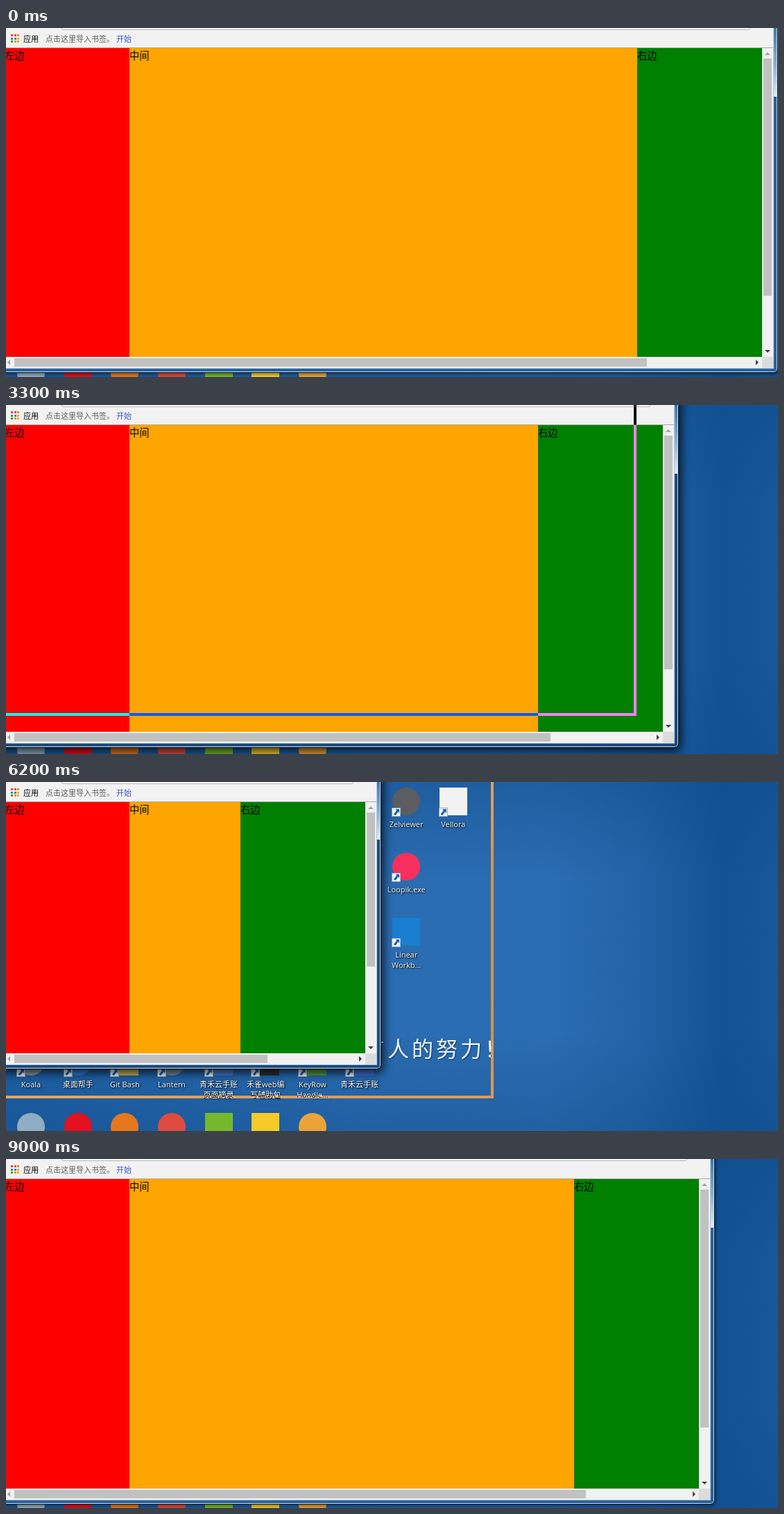
An HTML page for the animation above (9200 ms loop, 1113 by 503 pixels).

```html
<!DOCTYPE html>
<html lang="zh-CN">
<head>
<meta charset="utf-8">
<title>Three column layout</title>
<style>
  html, body { margin: 0; width: 100%; height: 100%; overflow: hidden; }
  div, span { position: absolute; box-sizing: border-box; white-space: nowrap; }
  #desk {
    inset: 0; overflow: hidden; isolation: isolate;
    font: 11px/15.4px 'Open Sans', 'Noto Sans CJK SC', 'Noto Sans CJK', sans-serif;
    background:
      linear-gradient(#0f4a8a70, #0f4a8a00 28%, #0f4a8a00 72%, #0f4a8a60),
      linear-gradient(90deg, #1d5fa2, #2a6cb1 45%, #2b6db2 70%, #2364a8 82%, #125395 93%, #165899);
  }
  .label { color: #fff; text-align: center; transform: translateX(-50%); text-shadow: 1px 1px 2px #000, 0 0 2px #0008; }
  .icon { width: 40px; height: 40px; }
  .round { border-radius: 50%; }
  .badge { width: 13px; height: 13px; background: #f3f6fa; border: 1px solid #9aa9b8; }
  .badge::after {
    content: ''; position: absolute; inset: 1px; background: #1f5fae;
    clip-path: polygon(35% 0, 100% 0, 100% 65%, 78% 45%, 40% 100%, 5% 85%, 55% 22%);
  }
  #slogan {
    left: 480px; top: 361px; color: #eef4fa; letter-spacing: 4px; text-shadow: 1px 1px 2px #0006;
    font: 500 31px/44px 'Noto Sans CJK TC', 'Noto Sans CJK', sans-serif;
  }

  /* --w and --h are the right and bottom edges of the window */
  #win {
    --p: calc(var(--w) - 22); --b: calc(var(--h) - 22);
    left: -40px; top: -40px;
    width: calc((var(--w) + 41) * 1px); height: calc((var(--h) + 41) * 1px);
    border: 1px solid #0c1622; border-radius: 6px;
    background: #2a629c;
    box-shadow: inset 0 0 0 1px #c3dcf0, 1px 2px 5px #0007;
  }
  #win.active { background: #1d4a7c; box-shadow: inset 0 0 0 1px #c3dcf0, 1px 3px 14px 2px #000c; }
  #gloss {
    right: 1px; top: 39px; width: 4px; height: calc(var(--h) * .2px);
    background: linear-gradient(#3f78b0, #8fb2d4 55%, #e3edf6);
  }
  #client {
    left: 39px; top: 39px; overflow: hidden; background: #f1f1f1; box-shadow: 0 0 0 1px #a9c6e0;
    width: calc((var(--p) + 16) * 1px); height: calc((var(--b) + 16) * 1px);
  }
  #bar { left: 0; right: 0; top: 0; height: 29px; background: #f2f2f2; border-bottom: 1px solid #a9a9a9; }
  #bar span { top: 8px; }
  #address { left: 80px; right: 33px; top: -20px; height: 23px; background: #fff; border: 1px solid #b2b2b2; border-radius: 3px; }
  .dot { width: 3px; height: 3px; }
  .column { top: 29px; height: calc((var(--b) - 29) * 1px); font-size: 14.3px; line-height: 21px; color: #000; }
  #left { left: -2px; width: 180px; background: red; }
  #middle { left: 178px; right: 196px; background: orange; }
  #right { right: 16px; width: 180px; background: green; }
  .thumb { background: #c1c1c1; }
  #vthumb { right: 2px; width: 12px; top: 44px; height: calc((var(--b) - 60) * (var(--b) - 29) / 539 * 1px); }
  #hthumb { left: 12px; bottom: 2px; height: 12px; width: calc((var(--p) - 28) * (var(--p) + 2) / (var(--p) + 181) * 1px); }
  #corner { right: 0; bottom: 0; width: 16px; height: 16px; background: #dcdcdc; }
  .arrow { background: #404040; }
  .off { background: #a3a3a3; }
  #up { right: 4px; top: 35px; width: 8px; height: 4px; clip-path: polygon(50% 0, 100% 100%, 0 100%); }
  #down { right: 4px; bottom: 22px; width: 8px; height: 4px; clip-path: polygon(0 0, 100% 0, 50% 100%); }
  #back { left: 2px; bottom: 4px; width: 4px; height: 8px; clip-path: polygon(0 50%, 100% 0, 100% 100%); }
  #next { right: 21px; bottom: 4px; width: 4px; height: 8px; clip-path: polygon(0 0, 100% 50%, 0 100%); }

  #outline { left: -10px; top: -10px; border: 4px solid #fff; mix-blend-mode: difference; }
</style>
</head>
<body>
<div id="desk">
  <div id="slogan">所有人的努力！</div>
  <div id="icons"></div>
  <div id="win">
    <div id="gloss"></div>
    <div id="client">
      <div id="bar">
        <div id="address"></div>
        <span style="left:25px">应用</span>
        <span style="left:57px;color:#5c5c5c">点击这里导入书签。</span>
        <span style="left:159px;color:#3355d0">开始</span>
      </div>
      <div id="left" class="column">左边</div>
      <div id="middle" class="column">中间</div>
      <div id="right" class="column">右边</div>
      <div id="vthumb" class="thumb"></div>
      <div id="hthumb" class="thumb"></div>
      <div id="corner"></div>
      <div id="up" class="arrow off"></div>
      <div id="down" class="arrow"></div>
      <div id="back" class="arrow off"></div>
      <div id="next" class="arrow"></div>
    </div>
  </div>
  <div id="outline"></div>
</div>
<script>
const $ = id => document.getElementById(id);

function add(parent, className, left, top, background = '', html = '') {
  const el = document.createElement('div');
  el.className = className;
  Object.assign(el.style, { left: left + 'px', top: top + 'px', background });
  el.innerHTML = html;
  parent.append(el);
}

// Desktop grid: column, row, colour, shape, label
const ICONS = [
  [8, 0, '#5b5d60', 'round', 'Zelviewer'],
  [9, 0, '#f2f2f2', '', 'Vellora'],
  [8, 1, '#f7305f', 'round', 'Loopik.exe'],
  [8, 2, '#1a7fd0', '', 'Linear<br>Workb...'],
  [0, 4, '#8a9aa5', 'round', 'Koala'],
  [1, 4, '#2f7be0', 'round', '桌面帮手'],
  [2, 4, '#c9b458', '', 'Git Bash'],
  [3, 4, '#6f8fa0', 'round', 'Lantern'],
  [4, 4, '#4a78c8', '', '青禾云手账<br>页面摘录'],
  [5, 4, '#2b2f33', '', '禾雀web编<br>写辅助包'],
  [6, 4, '#5a9a3c', '', 'KeyRow<br>Handle...'],
  [7, 4, '#3a6fd8', '', '青禾云手账'],
  [0, 5, '#8fadc4', 'round', ''],
  [1, 5, '#e3101f', 'round', ''],
  [2, 5, '#e5781e', 'round', ''],
  [3, 5, '#dd4b3e', 'round', ''],
  [4, 5, '#76b82c', '', ''],
  [5, 5, '#f5cb2a', '', ''],
  [6, 5, '#eba338', 'round', ''],
];
for (const [column, row, colour, shape, label] of ICONS) {
  const x = 36 + column * 67.65, y = 28 + row * 93.75;
  add($('icons'), 'icon ' + shape, x - 20, y - 20, colour);
  add($('icons'), 'badge', x - 21, y + 9);
  add($('icons'), 'label', x, y + 25, '', label);
}

const DOTS = ['#e8453c', '#e8453c', '#f08a24', '#2e9e4f', '#3f7de0', '#f2b01e', '#2e9e4f', '#f08a24', '#f2b01e'];
DOTS.forEach((colour, i) => add($('bar'), 'dot', 7 + i % 3 * 4.6, 9 + Math.floor(i / 3) * 4.6, colour));

// Each drag: start, release, final right edge, final bottom edge
const LOOP = 9200, STEP = 100;
const DRAGS = [
  [2100, 2600, 969, 493],
  [3000, 3500, 908, 447],
  [3800, 4200, 735, 430],
  [4600, 4900, 610, 419],
  [5400, 5800, 540, 413],
  [6000, 6400, 702, 455],
  [6700, 7100, 901, 487],
  [7500, 7800, 1021, 497],
];

function draw() {
  const t = performance.now() % LOOP;
  let w = 1112, h = 496, outline = null;
  for (const [start, release, endW, endH] of DRAGS) {
    if (t >= release) {
      [w, h] = [endW, endH];
    } else if (t >= start) {
      // The pointer rests for the last step before the button is released
      const step = Math.floor((t - start) / STEP) + 1;
      const progress = Math.min(1, step / ((release - start) / STEP - 1)) ** 1.1;
      outline = [w + (endW - w) * progress, h + (endH - h) * progress];
    }
  }
  $('win').style.setProperty('--w', w);
  $('win').style.setProperty('--h', h);
  $('win').className = t >= 400 && t < 9000 ? 'active' : '';
  $('outline').style.display = outline ? 'block' : 'none';
  if (outline) {
    $('outline').style.width = Math.round(outline[0]) + 11 + 'px';
    $('outline').style.height = Math.round(outline[1]) + 11 + 'px';
  }
  requestAnimationFrame(draw);
}
draw();
</script>
</body>
</html>
```
